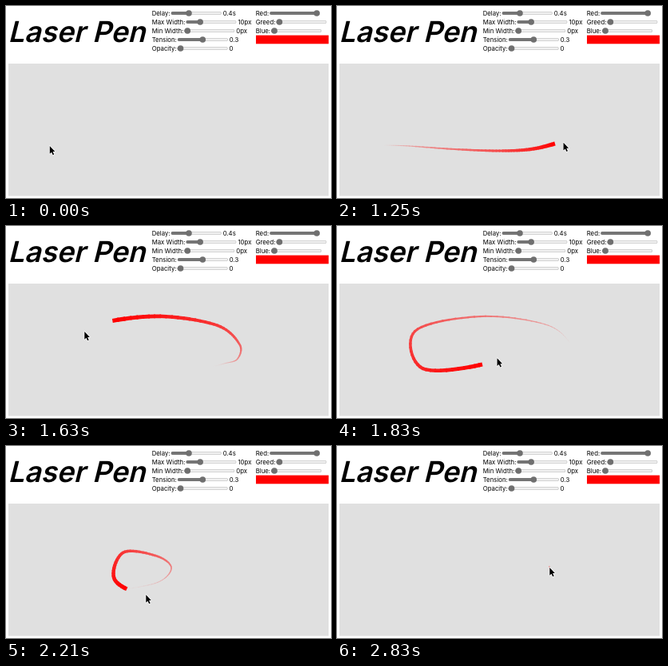
Animation, 407 px wide and 240 px high, one loop 4.04 s. Source, as an HTML page with a canvas:

```html
<!DOCTYPE html>
<html lang="en">
<head>
<meta charset="utf-8">
<title>Laser Pen</title>
<style>
  html, body { margin: 0; width: 100%; height: 100%; overflow: hidden; background: #fff; }
  canvas { display: block; width: 407px; height: 240px; }
</style>
</head>
<body>
<canvas id="stage"></canvas>
<script>
const W = 407, H = 240, LOOP = 4040, START = 790, TICK = 1000 / 24;
const LIFE = 10, MAX_WIDTH = 5.2;
const FONT = 'Inter, "Noto Sans", sans-serif';

const canvas = document.getElementById('stage');
const ctx = canvas.getContext('2d');
const dpr = window.devicePixelRatio || 1;
canvas.width = W * dpr;
canvas.height = H * dpr;
ctx.scale(dpr, dpr);

// Key points of the gesture, two ticks apart, joined by a smooth spline
const keys = [
  [55, 174], [58, 174], [90, 175], [147, 179], [203, 181], [243, 179], [273, 172],
  [290, 166], [292, 147], [261, 123], [180, 113], [98, 131], [107, 178], [182, 173],
  [207, 154], [190, 138], [147, 133], [136, 167], [175, 185], [231, 175], [261, 158],
  [266, 151]
];

const keyAt = i => keys[Math.max(0, Math.min(keys.length - 1, i))];

function pointAt(tick) {
  const u = (tick + 1) / 2, i = Math.floor(u), f = u - i;
  const [a, b, c, d] = [-1, 0, 1, 2].map(n => keyAt(i + n));
  return [0, 1].map(n => b[n] + f / 2 * (c[n] - a[n]
    + f * (2 * a[n] - 5 * b[n] + 4 * c[n] - d[n]
    + f * (3 * (b[n] - c[n]) + d[n] - a[n]))));
}

function pill(x, y, w, h, fill) {
  ctx.fillStyle = fill;
  ctx.beginPath();
  ctx.roundRect(x, y, w, h, h / 2);
  ctx.fill();
}

// The track follows its label, and the value follows the track.
function drawSlider(x, row, label, level, value = '') {
  const y = 9 + row * 11, length = 63, r = 3.8;
  ctx.font = '7.8px ' + FONT;
  const left = x + ctx.measureText(label).width + 1;
  const thumb = left + 4 + level * (length - 8);
  ctx.fillStyle = '#000';
  ctx.fillText(label, x, y + 3);
  ctx.fillText(value, left + length + 2, y + 3);
  pill(left, y - 2, length, 4, '#b8b8b8');
  pill(left + 0.6, y - 1.4, length - 1.2, 2.8, '#f0f0f0');
  pill(left, y - 2, thumb - left, 4, '#757575');
  pill(thumb - r, y - r, 2 * r, 2 * r, '#6f6f6f');
}

function drawTitle() {
  ctx.save();
  ctx.transform(1, 0, -0.25, 1, 2.5, 44.5);
  ctx.font = '600 36px ' + FONT;
  ctx.fillStyle = '#000';
  ctx.fillText('Laser Pen', 0, 0);
  ctx.restore();
}

function drawPage() {
  ctx.fillStyle = '#fff';
  ctx.fillRect(0, 0, W, H);
  drawTitle();
  drawSlider(182.7, 0, 'Delay:', 1 / 3, '0.4s');
  drawSlider(182.7, 1, 'Max Width:', 1 / 4, '10px');
  drawSlider(182.7, 2, 'Min Width:', 0, '0px');
  drawSlider(182.7, 3, 'Tension:', 1 / 2, '0.3');
  drawSlider(182.7, 4, 'Opacity:', 0, '0');
  drawSlider(312.7, 0, 'Red:', 1);
  drawSlider(312.7, 1, 'Greed:', 0);
  drawSlider(312.7, 2, 'Blue:', 0);
  ctx.fillStyle = '#f00';
  ctx.fillRect(313, 36.6, 91, 10.7);
  ctx.fillStyle = '#e0e0e0';
  ctx.fillRect(3, 72, 401, 165.5);
}

// The stroke thins and fades with age, one tick behind the pointer.
function drawTrail(head) {
  const step = 1 / 6;
  for (let u = Math.max(0, head - LIFE); u < head - 0.01; u += step) {
    const life = 1 - (head - u - step) / LIFE;
    const mix = v => Math.round(224 + (v - 224) * Math.min(1, life) ** 0.8);
    ctx.strokeStyle = `rgb(${mix(255)},${mix(0)},${mix(0)})`;
    ctx.lineWidth = MAX_WIDTH * life;
    ctx.beginPath();
    ctx.moveTo(...pointAt(u));
    ctx.lineTo(...pointAt(Math.min(head, u + step * 1.25)));
    ctx.stroke();
  }
}

const arrow = new Path2D('M.6 1V10.8L2.8 8.8 4.5 12.3 6 11.6 4.4 8.1H7.2Z');

function drawPointer([x, y]) {
  ctx.save();
  ctx.translate(x - 0.3, y);
  ctx.lineJoin = 'round';
  ctx.lineWidth = 1.4;
  ctx.strokeStyle = '#fff';
  ctx.stroke(arrow);
  ctx.fillStyle = '#000';
  ctx.fill(arrow);
  ctx.restore();
}

function render(time) {
  const tick = Math.floor(((time % LOOP) - START + 2) / TICK);
  const now = Math.max(0, tick + 1);
  drawPage();
  drawTrail(now - 1);
  drawPointer(pointAt(now));
}

const begin = performance.now();
function loop() {
  render(performance.now() - begin);
  requestAnimationFrame(loop);
}
loop();
</script>
</body>
</html>
```
